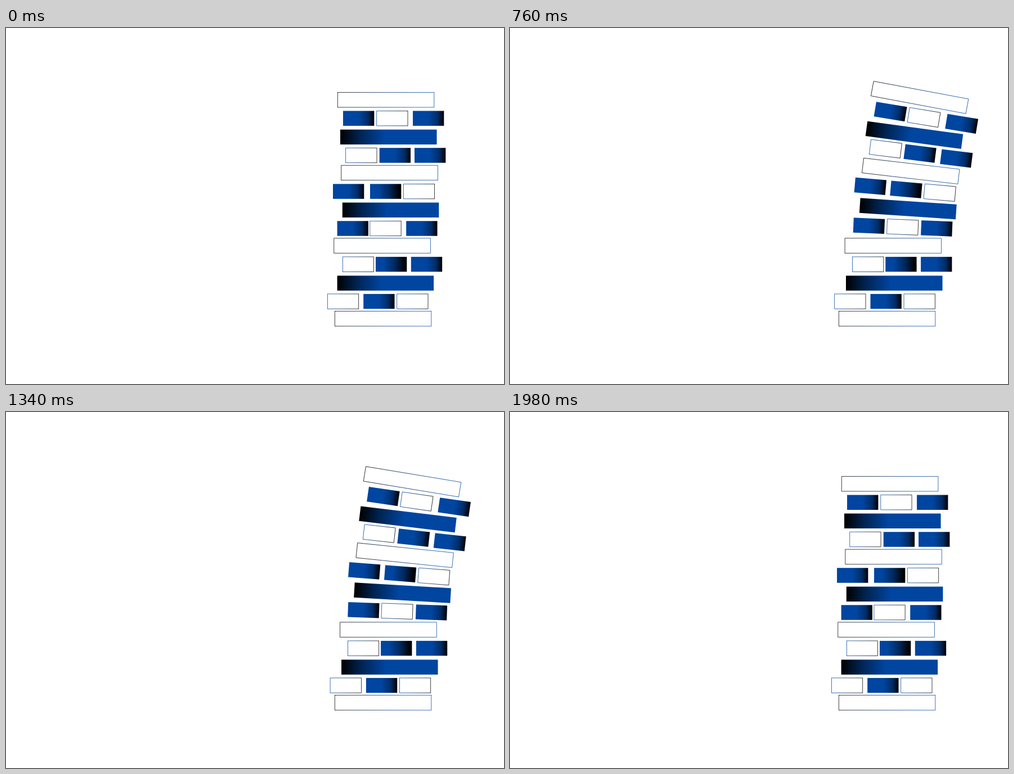
An HTML page for the animation above (2 s loop, 885x633 px).

```html
<!DOCTYPE html>
<html lang="en">
<head>
<meta charset="utf-8">
<title>Swaying tower</title>
<style>
  html, body { margin: 0; width: 100%; height: 100%; overflow: hidden; background: #fff; }
  svg { display: block; }
</style>
</head>
<body>
<svg id="stage" width="885" height="633" viewBox="0 0 885 633" fill="none" stroke-width=".75">
  <defs>
    <linearGradient id="beam">
      <stop offset="0" stop-color="#000"/>
      <stop offset=".2" stop-color="#002350"/>
      <stop offset=".46" stop-color="#0045a0"/>
    </linearGradient>
    <linearGradient id="block">
      <stop offset=".5" stop-color="#0045a0"/>
      <stop offset=".8" stop-color="#002c66"/>
      <stop offset="1" stop-color="#000"/>
    </linearGradient>
    <linearGradient id="dark">
      <stop offset=".25" stop-color="#0045a0"/>
      <stop offset=".6" stop-color="#002a61"/>
      <stop offset=".95" stop-color="#000"/>
    </linearGradient>
    <linearGradient id="beamLine">
      <stop offset="0" stop-color="#000"/>
      <stop offset=".8" stop-color="#0045a0"/>
    </linearGradient>
    <linearGradient id="blockLine">
      <stop offset=".1" stop-color="#0045a0"/>
      <stop offset="1" stop-color="#000"/>
    </linearGradient>
  </defs>
</svg>
<script>
const LOOP = 2000, PEAK = 1015, STEP = 20;
const HEIGHT = 26.5, BEAM = 171.5, BLOCK = 55.3;

const kinds = {
  beam: { width: BEAM, fill: "url(#beam)" },
  beamLine: { width: BEAM, stroke: "url(#beamLine)" },
  block: { width: BLOCK, fill: "url(#block)" },
  dark: { width: BLOCK, fill: "url(#dark)" },
  blockLine: { width: BLOCK, stroke: "url(#blockLine)" }
};

// Rows: top, full tilt in degrees, then bricks as kind, x, full shift x, full shift y.
const rows = [
  [114.5, 12.6, ["beamLine", 589.3, 63, -5.1]],
  [147.4, 11.1, ["block", 599, 58.7, -14.1], ["blockLine", 658.7, 58.3, -2], ["block", 723, 61.7, 11.5]],
  [180.6, 9.15, ["beam", 594, 46, -4]],
  [213.2, 8.5, ["blockLine", 603.7, 42.8, -13.8], ["block", 663.7, 44.2, -3.9], ["block", 726, 47, 6.6]],
  [244.2, 7.9, ["beamLine", 595.8, 36.4, -3.7]],
  [277.3, 6, ["block", 581, 37.6, -10.9], ["dark", 647, 34.8, -4], ["blockLine", 706.3, 35.3, 2.6]],
  [310.4, 4.55, ["beam", 597.8, 28.2, -2.9]],
  [343.2, 2.8, ["block", 588.6, 25.7, -5.6], ["blockLine", 646.8, 27.6, -3], ["block", 711.2, 23, -0.1]],
  [373.8, 0, ["beamLine", 582.8, 14.6, 0]],
  [406.9, 0, ["blockLine", 598.3, 12.2, 0], ["dark", 657, 12.2, 0], ["block", 719.8, 12.2, 0]],
  [440.4, 0, ["beam", 588.6, 10, 0]],
  [472.9, 0, ["blockLine", 571.4, 6.3, 0], ["block", 635.2, 6.3, 0], ["blockLine", 694.7, 6.3, 0]],
  [503.6, 0, ["beamLine", 584.3, 0, 0]]
];

const stage = document.getElementById("stage");

function addBrick(y, tilt, [kind, x, dx, dy]) {
  const el = document.createElementNS("http://www.w3.org/2000/svg", "rect");
  const attrs = { x, y, height: HEIGHT, ...kinds[kind] };
  for (const key in attrs) el.setAttribute(key, attrs[key]);
  stage.appendChild(el);
  return { el, dx, dy, tilt, cx: x + attrs.width / 2, cy: y + HEIGHT / 2 };
}

const bricks = rows.flatMap(([y, tilt, ...items]) =>
  items.map(item => addBrick(y, tilt, item)));

function sway(t) {
  const u = t < PEAK ? t / PEAK : (LOOP - t) / (LOOP - PEAK);
  return u * u * (3 - 2 * u);
}

function draw(t) {
  const p = sway(t);
  for (const b of bricks) {
    b.el.setAttribute("transform",
      `translate(${b.dx * p} ${b.dy * p}) rotate(${b.tilt * p} ${b.cx} ${b.cy})`);
  }
}

const start = performance.now();
function tick() {
  const t = (performance.now() - start) % LOOP;
  draw(Math.floor(t / STEP) * STEP);
  requestAnimationFrame(tick);
}
draw(0);
requestAnimationFrame(tick);
</script>
</body>
</html>
```
